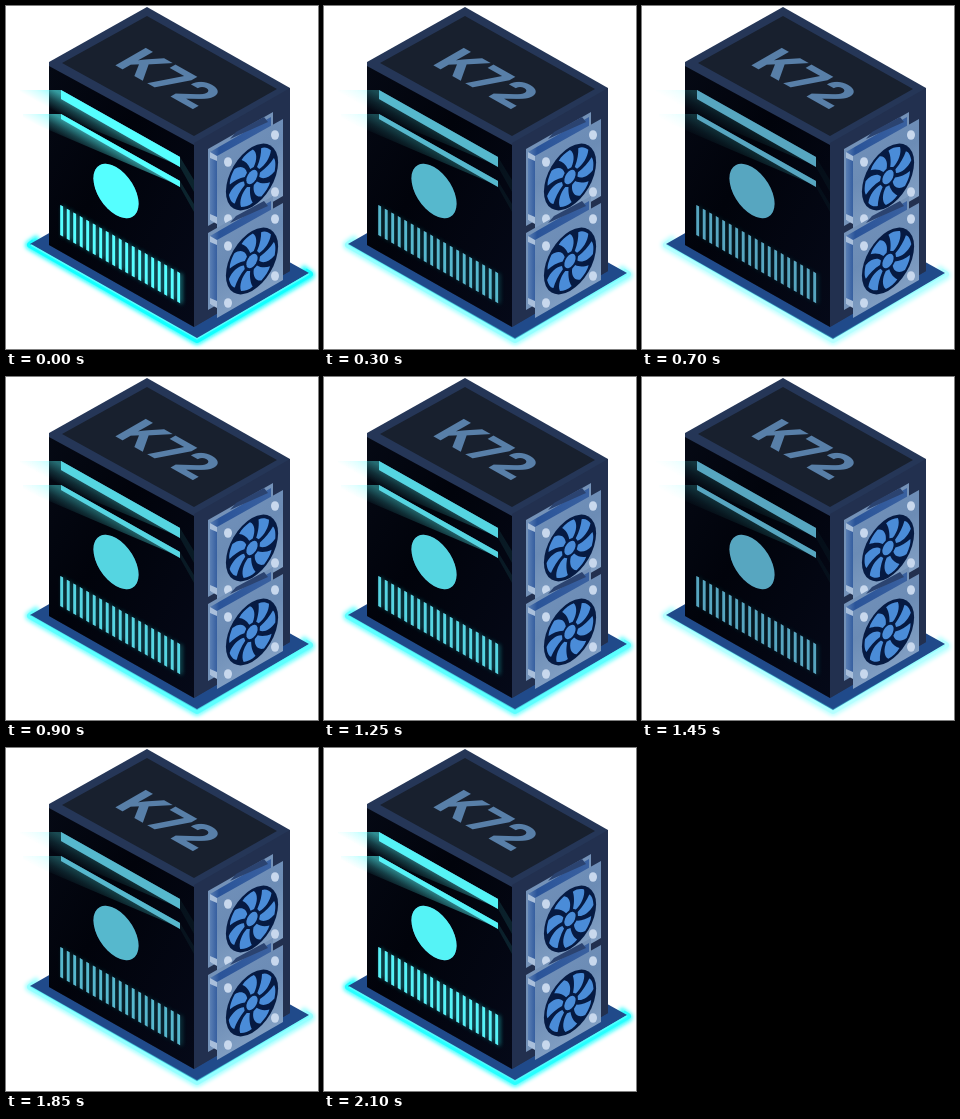
An HTML page that plays this animation: 312x343 px, repeating every 2150 ms.

```html
<!DOCTYPE html>
<html>
<head>
<meta charset="utf-8">
<style>
html, body { margin: 0; width: 100%; height: 100%; overflow: hidden; background: #fff; }
svg { display: block; width: 312px; height: 343px; }
text { font: 800 48px Inter, Arial, sans-serif; }
</style>
</head>
<body>
<svg viewBox="0 0 312 343">
  <defs>
    <linearGradient id="side" x2="1" y2="1">
      <stop stop-color="#050914"/><stop offset=".4" stop-color="#01030b"/><stop offset="1" stop-color="#050918"/>
    </linearGradient>
    <linearGradient id="plate" x2=".4" y2="1">
      <stop stop-color="#7392bb"/><stop offset=".5" stop-color="#6c8cb5"/><stop offset="1" stop-color="#86a3c6"/>
    </linearGradient>
    <linearGradient id="well" x2="1">
      <stop stop-color="#5a7fb4"/><stop offset=".15" stop-color="#2a5499"/><stop offset="1" stop-color="#3a61a0"/>
    </linearGradient>
    <linearGradient id="beam" gradientUnits="userSpaceOnUse" x1="55" y1="4" x2="46" y2="20">
      <stop stop-color="#5ff" stop-opacity=".6"/><stop offset=".5" stop-color="#5ff" stop-opacity=".25"/><stop offset="1" stop-color="#5ff" stop-opacity="0"/>
    </linearGradient>
    <filter id="soft" x="-20%" y="-20%" width="140%" height="140%"><feGaussianBlur stdDeviation="2"/></filter>
    <g id="marks">
      <path d="M55 84 174 151V161L55 93ZM55 108 174 175V181L55 113Z"/>
      <g id="slots"></g>
      <circle r="24" transform="matrix(.94 .53 0 1 110 185)"/>
    </g>
    <g id="unit">
      <path d="M202 143 267 106V183L202 220Z" fill="#7492b8"/>
      <path d="M204 146 265 111V180L204 215Z" fill="url(#well)"/>
      <path d="M224 133 230 126 258 111 262 116Z" fill="#2b4370"/>
      <path d="M204 146 211 150V155L204 152ZM204 208 211 211V218L204 214Z" fill="#a9bfdb"/>
      <path d="M211 150 277 113V190L211 228Z" fill="url(#plate)"/>
      <g id="screws" fill="#c8d8ed"></g>
      <g transform="matrix(.87 -.49 0 1 246 171)">
        <circle r="30" fill="#061a42"/>
        <g class="fan" fill="#4a8cd8"><circle r="6.5"/></g>
      </g>
    </g>
  </defs>

  <g class="glow" fill="none" stroke="#1ff" stroke-linejoin="round">
    <path d="M33 233 24 239 191 334 304 269 295 263" stroke-width="9" filter="url(#soft)"/>
    <path d="M28 236 24 239 191 334 304 268 299 265" stroke-width="6"/>
  </g>
  <path d="M24 238 136 174 303 267 191 333Z" fill="#204a8a"/>
  <path class="glow" d="M25 239 191 333 303 268" fill="none" stroke="#5ff" stroke-width="1.5"/>

  <path d="M141 1 284 82V265L188 321 43 239V56Z" fill="#253657"/>
  <path d="M188 137 284 82V265L188 321Z" fill="#22304f"/>
  <path d="M141 10 271 83 188 130 56 57Z" fill="#18202e"/>
  <path d="M43 60 188 139V321L43 239Z" fill="url(#side)"/>
  <text transform="matrix(.87 .49 -.87 .5 107 58)" fill="#587fa8">K72</text>

  <use href="#unit"/>
  <use href="#unit" y="84"/>

  <g class="glow">
    <g id="beams" fill="url(#beam)"></g>
    <path d="M174 151 188 174V186L174 161ZM174 175 188 198V206L174 181Z" fill="#5ff" opacity=".12"/>
    <use href="#slots" x="2" y="1" fill="#2bb" opacity=".8" filter="url(#soft)"/>
  </g>
  <use href="#marks" fill="#587fa5"/>
  <use href="#marks" class="glow" fill="#5ff"/>
</svg>
<script>
const LOOP = 2150, STEP = 50, PULSE = LOOP / 2, BLADES = 7;
const $ = id => document.getElementById(id);
const repeat = (n, f) => Array.from({ length: n }, (_, i) => f(i)).join('');

$('slots').innerHTML = repeat(19, i => {
  const x = 54.3 + i * 6.5, y = 199 + i * 3.7;
  return `<path d="M${x} ${y}l2.8 1.6v30l-2.8-1.6z"/>`;
});
$('screws').innerHTML = [[222, 156], [269, 129], [222, 213], [269, 186]]
  .map(([x, y]) => `<ellipse cx="${x}" cy="${y}" rx="4" ry="4.8"/>`).join('');
$('beams').innerHTML = [[84, 9, 41], [108, 5, 38]].map(([y, h, w]) =>
  `<path transform="translate(0 ${y})" d="M55 0 174 67V${67 + h}L${55 - w} ${h}V0Z"/>`).join('');

const fan = document.querySelector('.fan');
fan.innerHTML += repeat(BLADES, i =>
  `<path transform="rotate(${i * 360 / BLADES})" d="M-2-9C-4-15-8-20-12-23-9-26-4-27 1-27 6-22 6-14 2-9Z"/>`);
const glows = document.querySelectorAll('.glow');

function draw(now) {
  const t = Math.floor(now % LOOP / STEP) * STEP;
  const glow = Math.abs(1 - 2 * (t % PULSE) / PULSE);
  glows.forEach(g => g.setAttribute('opacity', glow));
  fan.setAttribute('transform', `rotate(${720 * t / LOOP})`);
}

let start;
function tick(now) {
  start ??= now;
  draw(now - start);
  requestAnimationFrame(tick);
}
draw(0);
requestAnimationFrame(tick);
</script>
</body>
</html>
```
